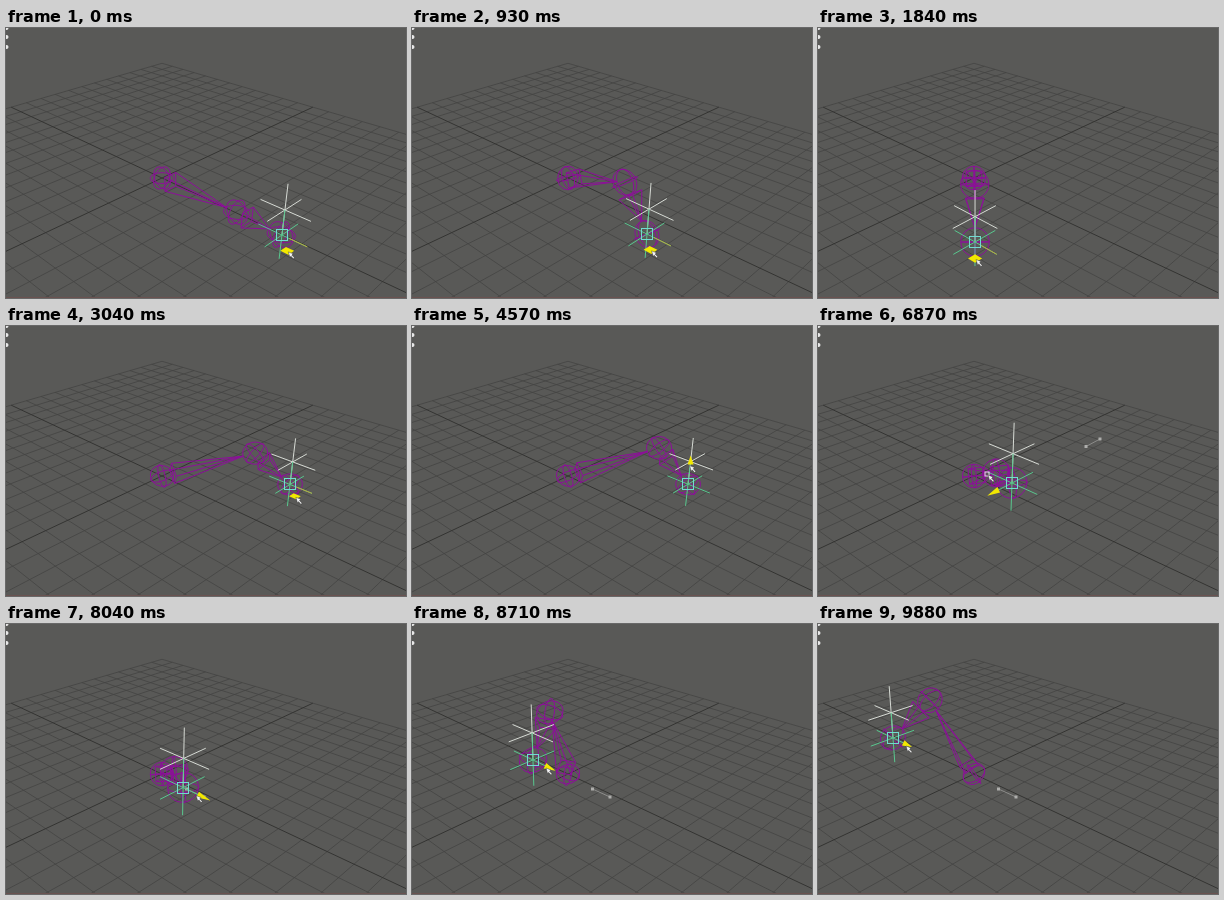
Animation of 400 by 270 pixels, one loop 9920 ms. Source, as an HTML page with a canvas:

```html
<!DOCTYPE html>
<html lang="en">
<head>
<meta charset="utf-8">
<title>Arm rig viewport</title>
<style>
html, body { margin: 0; width: 100%; height: 100%; overflow: hidden; background: #595957; }
canvas { display: block; }
</style>
</head>
<body>
<canvas id="view" width="400" height="270"></canvas>
<script>
const ctx = document.getElementById('view').getContext('2d');
const LOOP = 9920, FOCAL = 567, DIST = 2.034, CX = 156, CY = 150;
const UPPER = 0.341, LOWER = 0.171, JOINT = 0.042, ARM = 0.088;

// World axes in camera space: right, up, towards the viewer
const X = [0.707, -0.332, 0.624], Z = [-0.707, -0.332, 0.624], UP = [0, 0.883, 0.47];

const add = (a, b, k = 1) => a.map((v, i) => v + b[i] * k);
const dot = (a, b) => a[0] * b[0] + a[1] * b[1] + a[2] * b[2];
const unit = a => a.map(v => v / Math.hypot(...a));
const cross = (a, b) => [a[1] * b[2] - a[2] * b[1], a[2] * b[0] - a[0] * b[2], a[0] * b[1] - a[1] * b[0]];
const project = p => {
  const s = FOCAL / (DIST - p[2]);
  return [CX + p[0] * s, CY - p[1] * s];
};
const groundDepth = y => DIST - 0.883 * (y - CY) / (131 + 0.434 * (y - CY));
const unproject = (x, y, depth) =>
  [(x - CX) * depth / FOCAL, (CY - y) * depth / FOCAL, DIST - depth];

// Handle path: time, screen x, screen y, depth (on the ground when left out)
const path = [
  [0, 276, 207], [1000, 232, 206], [1750, 157, 214], [1880, 157, 214], [2040, 174, 210],
  [2450, 254, 193], [2800, 283, 171], [2940, 283, 171], [3040, 284, 158.5], [3300, 284, 158],
  [3500, 284, 158], [3900, 277, 174], [4470, 276, 159], [4570, 276, 158.5, 1.973],
  [4720, 279, 116, 1.895], [4900, 276, 153, 1.965], [5040, 276, 153, 1.965],
  [5640, 284, 109, 1.88], [5970, 284, 109, 1.88], [6210, 282, 113, 1.885],
  [6370, 282, 113, 1.885], [6860, 194, 157, 1.535], [7210, 194, 157, 1.535],
  [7710, 180, 165, 1.525], [8010, 180, 165, 1.525], [8710, 121, 136, 1.69],
  [8980, 116, 134, 1.705], [9040, 116, 134, 1.705], [9610, 77, 115, 1.83],
  [9810, 77, 115, 1.83], [9880, 75, 114, 1.84], [LOOP, 75, 114, 1.84]
].map(([t, x, y, d]) => ({ t, p: unproject(x, y, d || groundDepth(y)) }));

function handleAt(t) {
  const i = path.findIndex(k => k.t > t);
  const a = path[i - 1], b = path[i], f = (t - a.t) / (b.t - a.t);
  return a.p.map((v, j) => v + (b.p[j] - v) * f);
}

function trace(points, color, close) {
  ctx.beginPath();
  points.forEach(p => ctx.lineTo(...p));
  if (close) ctx.closePath();
  ctx.strokeStyle = color;
  ctx.stroke();
}

function fill(points, color) {
  ctx.beginPath();
  points.forEach(p => ctx.lineTo(...p));
  ctx.closePath();
  ctx.fillStyle = color;
  ctx.fill();
}

const line = (a, b, color) => trace([project(a), project(b)], color);

function drawGrid() {
  const at = (i, j) => add(X.map(v => v * i / 12), Z, j / 12);
  ctx.lineWidth = 0.8;
  for (let i = -12; i <= 12; i++) {
    if (!i) continue;
    line(at(i, -12), at(i, 12), '#454543');
    line(at(-12, i), at(12, i), '#454543');
  }
  ctx.lineWidth = 1;
  line(at(0, -12), at(0, 12), '#343432');
  line(at(-12, 0), at(12, 0), '#343432');
}

function frameOf(n) {
  const side = unit(cross(n, UP));
  return [n, side, cross(side, n)];
}

function drawJoint(c, axes, color) {
  for (let k = 0; k < 3; k++) {
    const a = axes[k], b = axes[(k + 1) % 3], ring = [];
    for (let i = 0; i < 28; i++) {
      const w = i * Math.PI / 14;
      ring.push(project(add(add(c, a, JOINT * Math.cos(w)), b, JOINT * Math.sin(w))));
    }
    trace(ring, color, true);
  }
}

function drawBone(from, to, [n, side, top], color) {
  const base = add(from, n, JOINT), tip = add(to, n, -JOINT);
  const corners = [[1, 1], [1, -1], [-1, -1], [-1, 1]].map(([a, b]) =>
    add(add(base, side, a * JOINT * 0.65), top, b * JOINT * 0.65));
  trace(corners.map(project), color, true);
  corners.forEach(c => line(c, tip, color));
}

function drawChain(target) {
  const color = '#8d0f9a', root = [0, 0, 0];
  const n = unit(target), d = Math.min(Math.hypot(...target), UPPER + LOWER - 1e-4);
  const bend = Math.acos((UPPER ** 2 + d * d - LOWER ** 2) / (2 * UPPER * d));
  const pole = unit(add(UP, n, -dot(UP, n)));
  const elbow = add(n.map(v => v * UPPER * Math.cos(bend)), pole, UPPER * Math.sin(bend));
  const end = n.map(v => v * d);
  const upper = frameOf(unit(elbow)), lower = frameOf(unit(add(end, elbow, -1)));
  drawJoint(root, upper, color);
  drawBone(root, elbow, upper, color);
  drawJoint(elbow, lower, color);
  drawBone(elbow, end, lower, color);
  drawJoint(end, lower, color);
}

function drawLocator(c, color) {
  [X, Z, UP].forEach(a => line(add(c, a, -ARM), add(c, a, ARM), color));
}

function drawArrow(c, axis) {
  const a = project(add(c, axis, ARM * 0.6)), b = project(add(c, axis, ARM * 1.1));
  const len = Math.hypot(b[0] - a[0], b[1] - a[1]);
  const nx = (a[1] - b[1]) / len * 3, ny = (b[0] - a[0]) / len * 3;
  fill([b, [a[0] + nx, a[1] + ny], [a[0] - nx, a[1] - ny]], '#f2e800');
}

function drawCursor(x, y) {
  const shape = [[0, 0], [5, 2], [3.6, 3.2], [6.2, 6], [5, 7], [2.8, 4.4], [1.6, 5.4]];
  const points = shape.map(p => [x + p[0], y + p[1]]);
  fill(points, '#f4f4f4');
  ctx.lineWidth = 0.4;
  trace(points, '#222', true);
  ctx.lineWidth = 1;
}

function drawGhost(a, b) {
  trace([a, b], '#8c8c8a');
  ctx.fillStyle = '#aeaeac';
  [a, b].forEach(p => ctx.fillRect(p[0] - 1.5, p[1] - 1.5, 3, 3));
}

function drawHandle(p, t) {
  const [x, y] = project(p), raised = add(p, UP, ARM);
  drawLocator(raised, '#d6dad4');
  drawLocator(p, '#58c78e');
  ctx.strokeStyle = '#70dcd0';
  ctx.strokeRect(Math.round(x) - 5.5, Math.round(y) - 5.5, 11, 11);

  if (t < 4480) {
    line(add(p, X, ARM * 0.3), add(p, X, ARM), '#b9a93c');
    const corner = (a, b) => project(add(add(p, X, ARM * a), Z, ARM * b));
    fill([corner(0.5, 0.5), corner(0.82, 0.5), corner(0.82, 0.82), corner(0.5, 0.82)], '#f2e800');
    const c = corner(0.66, 0.66);
    drawCursor(c[0] + 1, c[1] + 1);
  } else if (t < 6300) {
    const [wx, wy] = project(raised);
    fill([[wx, wy - 6], [wx + 3, wy + 3], [wx - 3, wy + 3]], '#f2e800');
    drawCursor(wx - 1, wy + 4);
  } else if (t < 7900) {
    drawArrow(p, Z);
    ctx.strokeStyle = '#e4e4e4';
    ctx.strokeRect(x - 27, y - 11, 4, 4);
    drawCursor(x - 24, y - 8);
  } else {
    drawArrow(p, X);
    drawCursor(x + 13, y + 8);
  }
}

function render(now) {
  const t = now % LOOP, p = handleAt(t);
  ctx.fillStyle = '#595957';
  ctx.fillRect(0, 0, 400, 270);
  drawGrid();
  drawChain(p);
  if (t >= 6370 && t < 7210) drawGhost([268, 120.5], [282, 113]);
  if (t >= 8010) drawGhost([180.5, 165], [198, 173]);
  drawHandle(p, t);

  // Clipped interface edges
  ctx.fillStyle = '#e8e8e8';
  [0, 9, 19].forEach(y => {
    ctx.beginPath();
    ctx.arc(0.5, y, 2, 0, 7);
    ctx.fill();
  });
  ctx.fillStyle = '#6a5250';
  ctx.fillRect(0, 269, 400, 1);
}

const start = performance.now();
function tick() {
  render(performance.now() - start);
  requestAnimationFrame(tick);
}
tick();
</script>
</body>
</html>
```
